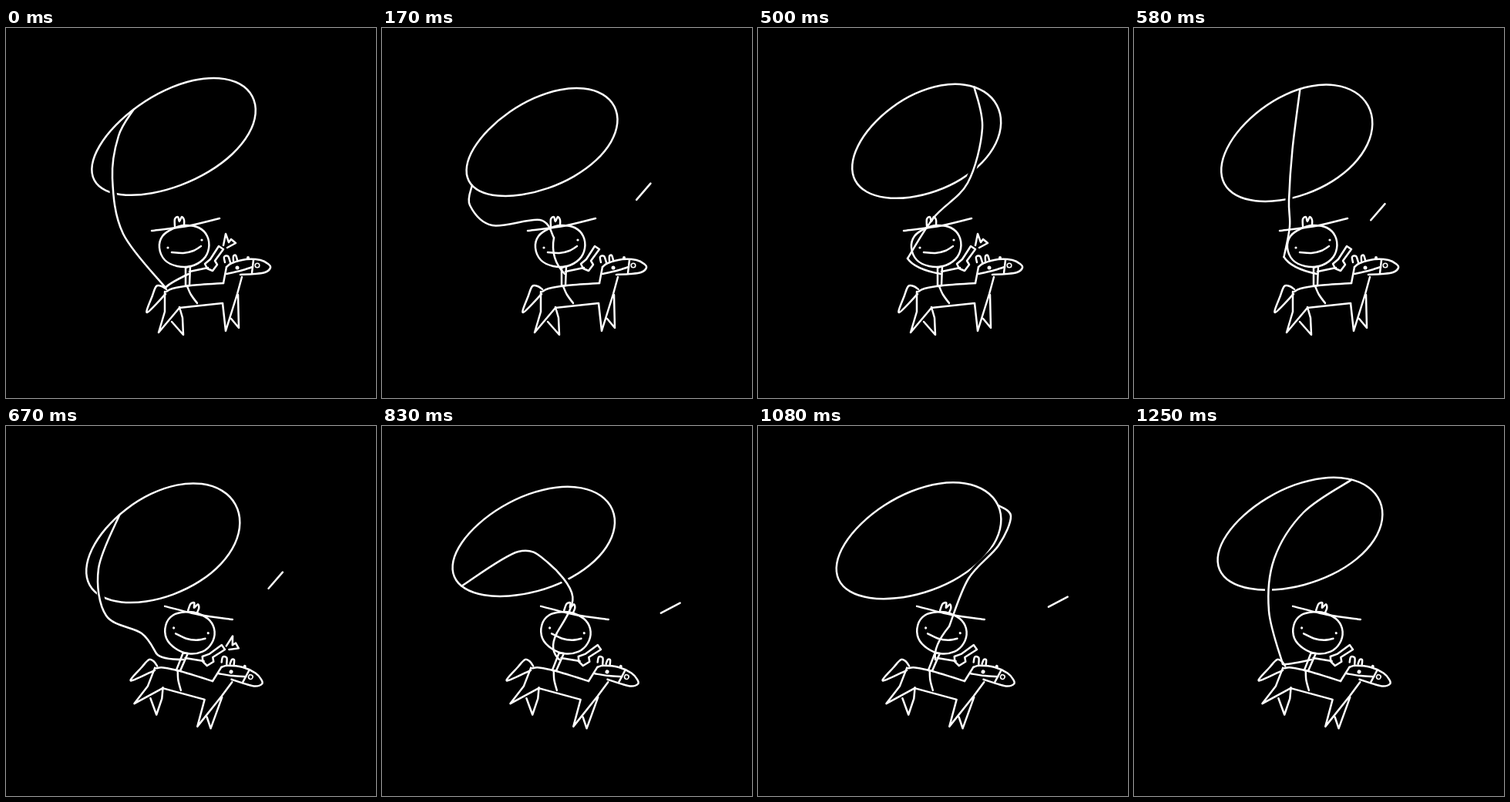
Write an HTML page with a canvas that moves like this. It is 480 px wide and 480 px high and loops after 1330 ms.

```html
<!DOCTYPE html>
<html lang="en">
<head>
<meta charset="utf-8">
<title>Lasso rider</title>
<style>
html, body { margin: 0; width: 100%; height: 100%; overflow: hidden; background: #000; }
canvas { display: block; width: 100vw; height: 100vh; }
</style>
</head>
<body>
<canvas id="stage" width="480" height="480"></canvas>
<script>
const ctx = document.getElementById('stage').getContext('2d');
const LOOP = 1330, STEPS = 16, LEAN_STEP = 8, LEAN = 0.372;
const rad = deg => deg * Math.PI / 180;
const lerp = (a, b, t) => a.map((v, i) => v + (b[i] - v) * t);

// Lasso key poses: ring is x, y, radii and tilt; knot is its angle on the ring;
// rope runs from the hand towards the knot. Steps between are tweened.
const lasso = [
  { at: 0, ring: [217, 143, 116, 60, -28], knot: 256, rope: [207,337, 152,267, 138,195, 146,140] },
  { at: 2, ring: [207, 150, 106, 57, -27], knot: 172, rope: [223,272, 205,249, 143,256, 114,230] },
  { at: 6, ring: [218, 149, 104, 63, -28], knot: -31, rope: [194,299, 228,246, 272,201, 291,130] },
  { at: 8, ring: [203, 154, 108, 65, -29], knot: -106, rope: [195,295, 176,269, 130,246, 120,185] },
  { at: 11, ring: [193, 151, 113, 59, -20], knot: -240, rope: [242,257, 283,198, 258,143, 205,152] },
  { at: 13, ring: [208, 151, 114, 64, -25], knot: -360, rope: [248,260, 273,198, 312,155, 328,117] },
  { at: 15, ring: [215, 142, 113, 63, -23], knot: -397, rope: [193,309, 175,240, 182,172, 220,112] }
];

// Each shot: firing step and how far its bullet gets
const shots = [[0, 69], [6, 85], [8, 80], [11, 97]];

const face = [217,260, 203,270, 199,285, 206,301, 222,309, 240,309, 256,300, 263,286, 261,270, 250,259, 232,256];
const strokes = {
  brim: [189,263, 235,257, 277,247],
  crown: [219,257, 219,248, 223,245, 225,251, 228,245, 231,249, 231,256],
  smile: [215,291, 230,292, 243,289, 253,283],
  back: [208,342, 216,338, 240,334, 282,331],
  ear: [284,304, 283,297, 288,296, 291,304],
  farEar: [295,302, 295,296, 298,295, 300,301],
  muzzle: [286,310, 293,305, 312,300, 330,301, 340,306, 343,311, 336,317, 322,319, 304,320],
  cheek: [286,319, 304,315, 320,310],
  tail: [208,339, 202,335, 195,335, 190,347, 183,369, 207,345],
  thigh: [235,335, 240,346, 248,357]
};
const body = 'M233 311L239 309L238 334L233 335ZM238 316L262 311M282 331L286 310M321 301L319 318'
  + 'M306 323L300 345L285 393L281 357L225 363L198 395L206 368L206 342'
  + 'M301 346L302 389L292 377M225 362L229 376L230 398L215 381';
const gun = 'M276 283L282 287L271 302L274 307L268 315L261 312L258 306L265 300Z';
const flash = 'M282 282L285 267L289 278L292 274L298 279L287 285';

const path = d => ctx.stroke(new Path2D(d));

function line(x1, y1, x2, y2) {
  ctx.beginPath();
  ctx.moveTo(x1, y1);
  ctx.lineTo(x2, y2);
  ctx.stroke();
}

function dot(x, y, r) {
  ctx.beginPath();
  ctx.arc(x, y, r, 0, 7);
  ctx.fill();
}

// Smooth stroke through flat x,y points
function curve(p, closed) {
  const n = p.length / 2;
  const at = i => {
    i = closed ? (i + n) % n : Math.max(0, Math.min(n - 1, i));
    return [p[2 * i], p[2 * i + 1]];
  };
  ctx.beginPath();
  ctx.moveTo(p[0], p[1]);
  for (let i = 0; i < (closed ? n : n - 1); i++) {
    const [a, b, c, d] = [at(i - 1), at(i), at(i + 1), at(i + 2)];
    ctx.bezierCurveTo(
      b[0] + (c[0] - a[0]) / 6, b[1] + (c[1] - a[1]) / 6,
      c[0] - (d[0] - b[0]) / 6, c[1] - (d[1] - b[1]) / 6, c[0], c[1]);
  }
  ctx.stroke();
}

// Point on the slightly egg-shaped ring
function ringPoint([x, y, rx, ry, tilt], deg) {
  const u = rad(deg), t = rad(tilt);
  const a = rx * Math.cos(u), b = ry * Math.sin(u) * (1 + 0.08 * Math.cos(u));
  return [x + a * Math.cos(t) - b * Math.sin(t), y + a * Math.sin(t) + b * Math.cos(t)];
}

function lassoAt(k) {
  const i = Math.max(0, lasso.findIndex(key => key.at >= k) - 1);
  const a = lasso[i], b = lasso[i + 1], t = (k - a.at) / (b.at - a.at);
  return {
    ring: lerp(a.ring, b.ring, t),
    knot: lerp([a.knot], [b.knot], t)[0],
    rope: lerp(a.rope, b.rope, t)
  };
}

function drawLasso(k) {
  const { ring, knot, rope } = lassoAt(k);
  const loop = [];
  for (let deg = 0; deg < 360; deg += 20) loop.push(...ringPoint(ring, deg));
  curve(loop, true);

  // The rope passes over the ring and leaves a small gap
  ctx.strokeStyle = '#000';
  ctx.lineWidth = 9;
  curve(rope);
  ctx.strokeStyle = '#fff';
  ctx.lineWidth = 2.5;
  curve([...rope, ...ringPoint(ring, knot)]);

  const [hx, hy] = rope, [sx, sy] = k < LEAN_STEP ? [237, 319] : [230, 303];
  ctx.beginPath();
  ctx.moveTo(sx, sy);
  ctx.quadraticCurveTo((sx + hx) / 2 - 12, (sy + hy) / 2 + 4, hx, hy);
  ctx.stroke();
}

// Draws in the rider's frame, which tips forward as the horse bucks
function posed(k, paint) {
  ctx.save();
  if (k >= LEAN_STEP) {
    ctx.translate(268, 331);
    ctx.rotate(LEAN);
    ctx.translate(-282, -331);
  }
  paint();
  ctx.restore();
}

function drawRider() {
  curve(face, true);
  Object.values(strokes).forEach(s => curve(s));
  path(body);
  path(gun);
  dot(210, 285, 1.6);
  dot(254, 275, 1.6);
  dot(300, 311, 2.5);
  dot(314, 298, 2);
  ctx.lineWidth = 1.6;
  ctx.beginPath();
  ctx.arc(326, 308, 2.8, 0, 7);
  ctx.stroke();
}

function drawShot(age, reach) {
  if (age === 0) path(flash);
  if (age === 1 || age === 2) {
    const tail = reach * (age === 1 ? 0.4 : 1), tip = tail + 28;
    line(285 + tail * 0.654, 275 - tail * 0.756, 285 + tip * 0.654, 275 - tip * 0.756);
  }
}

function draw(k) {
  ctx.fillStyle = '#000';
  ctx.fillRect(0, 0, 480, 480);
  ctx.fillStyle = ctx.strokeStyle = '#fff';
  ctx.lineWidth = 2.5;
  ctx.lineCap = ctx.lineJoin = 'round';
  drawLasso(k);
  posed(k, drawRider);
  for (const [start, reach] of shots) posed(start, () => drawShot(k - start, reach));
}

// Held drawings, twelve a second, on a 10 ms grid
function stepAt(t) {
  let k = 0;
  while (k + 1 < STEPS && Math.round((k + 1) * 25 / 3) * 10 <= t) k++;
  return k;
}

function tick() {
  draw(stepAt(performance.now() % LOOP));
  requestAnimationFrame(tick);
}
tick();
</script>
</body>
</html>
```
